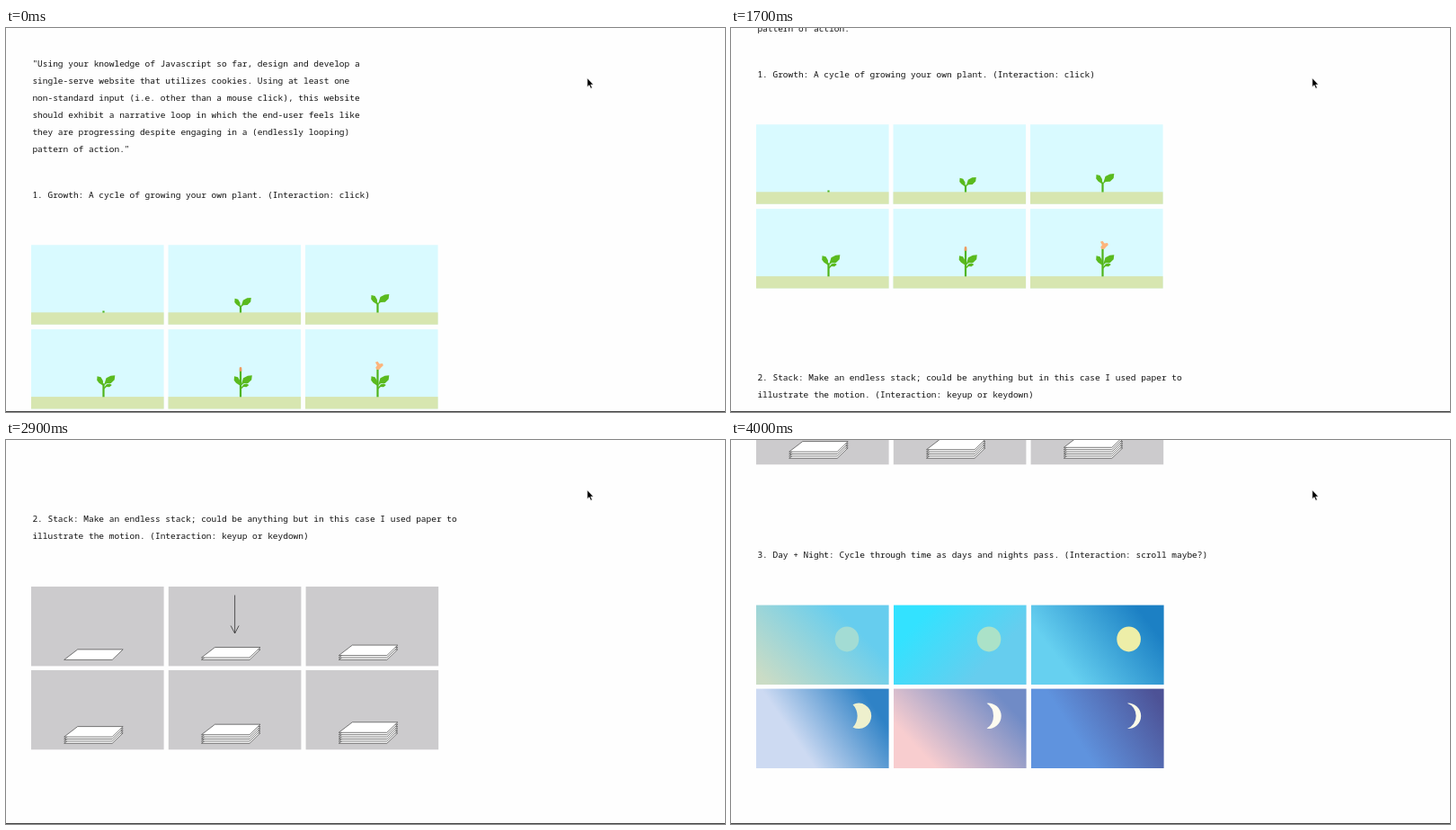
An HTML page for the animation above (4.1 s loop, 800 by 427 pixels).

```html
<!DOCTYPE html>
<html lang="en">
<head>
<meta charset="utf-8">
<title>Narrative loops</title>
<style>
  html, body { margin: 0; width: 100%; height: 100%; overflow: hidden; background: #fefefe; }
  svg { display: block; }
  text { font: 9.49px "Roboto Mono", "Noto Sans Mono", "DejaVu Sans Mono", monospace; fill: #111; white-space: pre; }
  .leaf { fill: #5aba1e; }
  .stem { stroke: #4fb41a; stroke-width: 2.2; }
  .line { fill: none; stroke: #333; stroke-width: .8; }
  .sheet { fill: #fff; stroke: #444; stroke-width: .7; }
</style>
</head>
<body>
<svg width="800" height="427" viewBox="0 0 800 427">
  <g id="page"></g>
  <path d="M646.8 55.8v9.6l2.2-1.9 1.7 3.7 1.5-.7-1.6-3.6h2.9z" fill="#000" stroke="#fff" stroke-width=".5"/>
  <rect y="426" width="800" height="1" fill="#444"/>
</svg>
<script>
const page = document.getElementById('page');
const W = 147.6, H = 88.4;

const at = (x, y, body, scale = 1) =>
  `<g transform="translate(${x} ${y}) scale(${scale})">${body}</g>`;
const box = (y, h, fill) => `<rect y="${y}" width="${W}" height="${h}" fill="${fill}"/>`;
const lines = (y, ...rows) =>
  rows.map((s, i) => `<text x="29.4" y="${y + i * 19}">${s}</text>`).join('');
// Six panels in two rows of three
const grid = (top, stepX, stepY, draw) => [0, 1, 2, 3, 4, 5].map(i =>
  at(28 + i % 3 * stepX, top + (i > 2 ? stepY : 0), draw(i))).join('');

const leaves = '<path class="leaf" d="M.4 .5L3-8 8-10.5 12.8-11 12.2-6 8.3-2.3 3.4-2z' +
  'M-.4 .5L-5-2.6-7.3-5.5-7-10-3-9-.6-5z"/>';
const sideLeaf = '<path class="leaf" d="M0 5.2L3.5 1 7 .2 9.3 1.6 6.6 4 3.4 3.6 0 7z"/>';
const bud = '<path d="M-1.3 1.5V-2.5L0-3.5 1.3-2.5V1.5z" fill="#ee9a5e"/>';
const flower = '<path d="M-2.6-5L0-6 2 -3.2 5.5-3.8 6.3-1.5 3.6 1 2 3-1 3.2-2.3 1-.6-1.5z" fill="#fcb47c"/>';

// Stem height, leaf height and leaf scale for each stage
const stages = [[2, 0, 0], [8, 6.5, .92], [11, 9.5, 1], [15, 13, 1], [31, 13, 1], [31, 13, 1]];

function plant(i) {
  const [stem, node, scale] = stages[i];
  let s = `<path class="stem" d="M0 0V${-stem}"/>`;
  if (scale) s += at(0, -node, leaves, scale);
  if (i > 2) s += at(0, -15, sideLeaf);
  if (i === 4) s += at(0, -30, bud);
  if (i === 5) s += at(0, -33.5, flower);
  return box(0, H, '#d9faff') + box(75, H - 75, '#d7e6b0') + at(80.5, 75.2, s);
}

function stack(i) {
  let s = box(0, H, '#cccbcd');
  for (let n = 0; n <= i; n++)
    s += at(36.7, 81.4 - n * 2.4, '<path class="sheet" d="M0 0L15-11.5H65.5L53.5 0z"/>');
  if (i === 1) s += '<path class="line" d="M73.8 9.5V52M69.3 43.5L73.8 52 78.3 43.5"/>';
  return s;
}

// Gradient line and its colours
const skies = [
  [15, 90, 95, 10, '#cbdcc5', '#66cdee'],
  [30, 15, 95, 75, '#33e2ff', '#66cdee'],
  [40, 72, 122, 8, '#66d0f0', '#1c80c4'],
  [48, 62, 124, 10, '#cddaf2', '#2f82c6'],
  [35, 75, 112, 2, '#f8cdcf', '#708bc6'],
  [55, 62, 140, 8, '#5f93de', '#4d5296']
];
const suns = [[101, '#a3dcd4'], [106, '#abe2c8'], [108.6, '#edeea8']];
// Moon centre, tip offset, inner curve radius and colour
const moons = [[114, -6.5, 16, '#eef0cd'], [105.5, -2, 15, '#fdfbf0'], [108, -1, 13.6, '#fafae8']];

function sky(i) {
  const [x1, y1, x2, y2, a, b] = skies[i];
  let s = `<linearGradient id="sky${i}" gradientUnits="userSpaceOnUse" x1="${x1}" y1="${y1}" x2="${x2}" y2="${y2}">` +
    `<stop stop-color="${a}"/><stop offset="1" stop-color="${b}"/></linearGradient>` + box(0, H, `url(#sky${i})`);
  if (i < 3) {
    const [x, fill] = suns[i];
    return s + `<ellipse cx="${x}" cy="37.8" rx="13.3" ry="14" fill="${fill}"/>`;
  }
  const [x, dx, r, fill] = moons[i - 3];
  const dy = Math.sqrt(14.2 ** 2 - dx * dx);
  const large = dx < 0 ? 1 : 0;
  return s + at(x, 30.2, `<path fill="${fill}" d="M${dx} ${-dy}A14.2 14.2 0 ${large} 1 ${dx} ${dy}` +
    `A${r} ${r + 1.2} 0 0 0 ${dx} ${-dy}z"/>`);
}

page.innerHTML =
  lines(43.4,
    '"Using your knowledge of Javascript so far, design and develop a',
    'single-serve website that utilizes cookies. Using at least one',
    'non-standard input (i.e. other than a mouse click), this website',
    'should exhibit a narrative loop in which the end-user feels like',
    'they are progressing despite engaging in a (endlessly looping)',
    'pattern of action."') +
  lines(188.9, '1. Growth: A cycle of growing your own plant. (Interaction: click)') +
  grid(241.3, 152.5, 93.8, plant) +
  lines(526.4,
    '2. Stack: Make an endless stack; could be anything but in this case I used paper to',
    'illustrate the motion. (Interaction: keyup or keydown)') +
  grid(598, 152.8, 92.9, stack) +
  lines(883.3, '3. Day + Night: Cycle through time as days and nights pass. (Interaction: scroll maybe?)') +
  grid(935.6, 153, 93, sky);

// Scroll position every 100 ms, after a still start
const LOOP = 4100, STEP = 100, STILL = 9;
const scroll = [1, 3, 12, 28, 48, 71, 97, 118, 134, 147, 161, 178, 201, 231.5, 275, 319,
  354, 381, 402, 418, 435, 458, 485, 517, 554.5, 611, 661, 698, 722, 737, 746, 752];

const start = performance.now();
function tick() {
  const step = Math.floor((performance.now() - start) % LOOP / STEP);
  page.setAttribute('transform', `translate(0 ${-(scroll[step - STILL] || 0)})`);
  requestAnimationFrame(tick);
}
tick();
</script>
</body>
</html>
```
